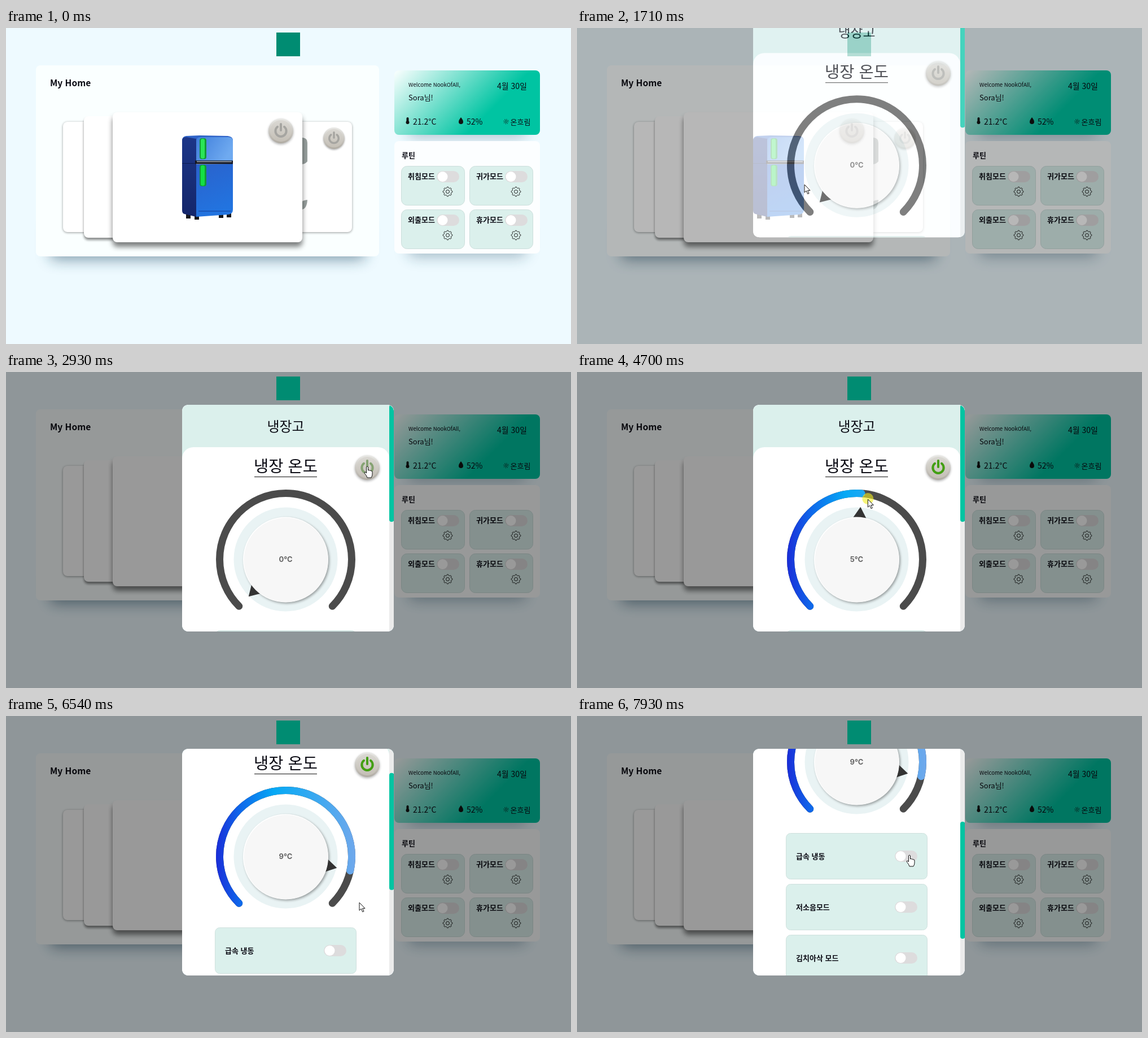
Animation, 1001 px wide and 559 px high, one loop 8 s. Source, as an HTML page:

```html
<!DOCTYPE html>
<html lang="ko">
<head>
<meta charset="utf-8">
<title>My Home</title>
<style>
  html, body { margin: 0; width: 100%; height: 100%; overflow: hidden; background: #eefaff; }
  svg { display: block; width: 1001px; height: 559px; }
  text { font-family: 'Noto Sans CJK KR', 'Noto Sans', sans-serif; fill: #0b0b14; white-space: pre; }
</style>
</head>
<body>
<svg id="stage" viewBox="0 0 1001 559"></svg>
<script>
const CX = 495.5, CY = 331.5;
const MINT = '#dbf0ec', TEAL = '#00c4a2';

// ---------- drawing helpers ----------
const rect = (x, y, w, h, r, fill, extra = '') =>
  `<rect x="${x}" y="${y}" width="${w}" height="${h}" rx="${r}" fill="${fill}" ${extra}/>`;
const circle = (x, y, r, fill, extra = '') =>
  `<circle cx="${x}" cy="${y}" r="${r}" fill="${fill}" ${extra}/>`;
const path = (d, fill, extra = '') => `<path d="${d}" fill="${fill}" ${extra}/>`;
const text = (x, y, size, str, extra = '') =>
  `<text x="${x}" y="${y}" font-size="${size}" ${extra}>${str}</text>`;
const group = (attrs, ...parts) => `<g ${attrs}>${parts.join('')}</g>`;
const gradient = (id, coords, ...stops) =>
  `<linearGradient id="${id}" ${coords}>${stops.map(([o, c]) =>
    `<stop offset="${o}" stop-color="${c}"/>`).join('')}</linearGradient>`;
const blur = (id, size) =>
  `<filter id="${id}" x="-20%" y="-60%" width="140%" height="220%"><feGaussianBlur stdDeviation="${size}"/></filter>`;

const polar = (r, deg) => {
  const a = deg * Math.PI / 180;
  return [CX + r * Math.sin(a), CY - r * Math.cos(a)].map(v => v.toFixed(2)).join(' ');
};

const panel = (x, y, w, h, fill, depth) =>
  rect(x + 25, y + h - 60, w - 50, 65, 8, '#1d4a63', `opacity="${depth}" filter="url(#blur13)"`) +
  rect(x, y, w, h, 8, fill);

const card = (x, y, w, h, drop, depth) =>
  rect(x, y + drop, w, h, 8, '#000', `opacity="${depth}" filter="url(#blur${drop > 4 ? 5 : 2})"`) +
  rect(x, y, w, h, 8, '#fff');

const powerGlyph = (color, extra = '') => group(
  `fill="none" stroke="${color}" stroke-width="4" stroke-linecap="round" ${extra}`,
  '<path d="M-6-7.2A9.6 9.6 0 1 0 6-7.2"/><path d="M0-12V-1"/>');

const powerButton = (x, y, scale = 1, extra = '') => group(
  `transform="translate(${x} ${y}) scale(${scale})"`,
  circle(0, 2, 22, '#000', 'opacity=".3" filter="url(#blur2)"'),
  circle(0, 0, 22, 'url(#metal)'),
  circle(0, 0, 19, 'url(#metalInner)'),
  powerGlyph('#a6a5a1'), extra);

const toggle = (x, y) =>
  rect(x, y - 10, 40, 20, 10, '#dddcdd') + circle(x + 10.5, y, 9, '#fff');

const gear = (x, y) => {
  const points = Array.from({ length: 80 }, (_, i) => {
    const a = i / 80 * 2 * Math.PI, r = 7.5 + 0.9 * Math.tanh(2 * Math.cos(8 * a));
    return `${(x + r * Math.cos(a)).toFixed(1)},${(y + r * Math.sin(a)).toFixed(1)}`;
  });
  return group('fill="none" stroke="#111"',
    `<polygon points="${points.join(' ')}"/>`, circle(x, y, 3, 'none'));
};

const routine = (x, y, label) =>
  rect(x + .5, y + .5, 112, 69, 10, MINT, 'stroke="#cbdedb"') +
  text(x + 12, y + 23, 13, label, 'font-weight="600"') +
  toggle(x + 63, y + 19) + gear(x + 82.5, y + 45.5);

const option = (y, label) =>
  rect(370.5, y + .5, 250, 81, 8, MINT, 'stroke="#cfe0dd"') +
  text(388, y + 46, 13, label, 'font-weight="600"') + toggle(563, y + 41);

// ---------- scene ----------
const defs = `<defs>
  ${blur('blur13', 13)}${blur('blur5', 5)}${blur('blur2', 2)}
  ${gradient('metal', 'x2="0" y2="1"', [0, '#e9e9e6'], [1, '#b0aba2'])}
  ${gradient('metalInner', 'x2="0" y2="1"', [0, '#dad8d3'], [1, '#c4bfb6'])}
  ${gradient('welcome', 'gradientUnits="userSpaceOnUse" x1="724" y1="39" x2="910" y2="225"',
    [0, '#fcffff'], [.65, TEAL])}
  ${gradient('dialFill', 'gradientUnits="userSpaceOnUse" x1="372" y1="0" x2="618" y2="0"',
    [0, '#1a2dd8'], [.17, '#0f67ea'], [.42, '#05a9f5'], [1, '#6ea8ec'])}
  ${gradient('fridgeFront', 'x2=".3" y2="1"', [0, '#2a62cc'], [1, '#2274e0'])}
  ${gradient('fridgeTop', 'x2="1" y2=".4"', [0, '#3f7edb'], [1, '#6faaf0'])}
  ${gradient('fridgeSide', 'x2="0" y2="1"', [0, '#1c3688'], [1, '#14266a'])}
  <clipPath id="modalClip">${rect(312, 58, 375, 401, 12, '#fff')}</clipPath>
</defs>`;

const fridge = group('',
  path('M319 328h8v9h-8zM334 331h8v8h-8zM377 329h8v7h-8zM391 326h8v9h-8z', '#17171c'),
  path('M312 199Q312 192 319 191L343 190 393 191Q402 192 402 199L337 204z', '#2f63c8'),
  path('M312 198Q313 193 320 193L337 196V334L316 329Q312 328 312 322z', 'url(#fridgeSide)'),
  path('M337 236V200Q337 193 345 193H394Q402 193 402 200V235z', 'url(#fridgeTop)'),
  path('M337 241L402 240V321Q402 329 394 330L337 334z', 'url(#fridgeFront)'),
  path('M341 324H398', 'none', 'stroke="#123d94"'),
  path('M312 239.500H337', 'none', 'stroke="#0d1c50"'),
  path('M335 237.500H402', 'none', 'stroke="#15151d" stroke-width="6"'),
  path('M338 236.500H400', 'none', 'stroke="#a8b4c4" stroke-width="1.500"'),
  rect(343, 195, 12, 37, 4, '#129b35'), rect(345, 196, 7, 35, 3, '#2ae656'),
  rect(343, 242, 12, 38, 4, '#129b35'), rect(345, 243, 7, 36, 3, '#14e044'));

const washer = path('M520 194H526Q534 195 534 203V236Q528 243 520 240z', '#98a09e') +
  path('M520 321H525Q533 319 534 304 527 304 520 310z', '#98a09e');

const home = group('',
  panel(53, 66, 608, 338, '#faffff', .55),
  text(78, 102.5, 15.6, 'My Home', 'font-weight="600"'),
  card(101, 166, 285, 195, 1, .4),
  card(328, 166, 285, 195, 1, .4),
  washer,
  powerButton(581, 195, .86),
  card(138, 156, 314, 215, 4, .45),
  card(189, 149, 336, 230, 8, .5),
  fridge,
  powerButton(487, 182));

const weather = group('',
  panel(688, 75, 258, 114, 'url(#welcome)', .3),
  text(713, 103.5, 9.6, 'Welcome NookOfAll,'),
  text(713, 128, 13, 'Sora님!'),
  text(870, 108, 14, '4월 30일'),
  text(721, 170.5, 14, '21.2°C'),
  text(816, 170.5, 14, '52%'),
  text(893.5, 170.5, 13, '온흐림'),
  rect(709.5, 158, 4, 9, 2, '#111'), circle(711.5, 167, 3, '#111'),
  path('M806 158Q810 163 810 166A4 4 0 0 1 802 166Q802 163 806 158', '#111'),
  circle(886, 165.5, 1.8, 'none', 'stroke="#111" stroke-width=".8"'),
  circle(886, 165.5, 3.9, 'none', 'stroke="#111" stroke-width="1.200" stroke-dasharray="1 2.060"'));

const routines = group('',
  panel(688, 200, 258, 199, '#fcfeff', .38),
  text(701, 230, 13, '루틴', 'font-weight="600"'),
  routine(700, 244, '취침모드'), routine(821, 244, '귀가모드'),
  routine(700, 321, '외출모드'), routine(821, 321, '휴가모드'));

const track = `M${polar(117, -135)}A117 117 0 1 1 ${polar(117, 135)}`;
const stroke = color => `stroke="${color}" stroke-width="13" stroke-linecap="round"`;
const dial = group('',
  path(track, 'none', stroke('#4b4b4b')),
  path(track, 'none', `id="fill" pathLength="270" ${stroke('url(#dialFill)')}`),
  circle(CX, CY, 92, '#e9f3f4'),
  circle(CX + 2, CY + 2.5, 75.5, '#000', 'opacity=".35" filter="url(#blur2)"'),
  `<polygon id="pointer" points="${CX},${CY - 93} ${CX - 12},${CY - 73} ${CX + 12},${CY - 73}" fill="#333"/>`,
  circle(CX, CY + .5, 75.5, '#fff'), circle(CX + .5, CY + 1, 74.5, '#f7f7f7'),
  text(CX, 336, 13, '', `id="value" text-anchor="middle" style="font:700 13px Inter,sans-serif;fill:#666"`));

const centered = 'text-anchor="middle" font-weight="300"';
const modal = group('id="modal"', group('clip-path="url(#modalClip)"',
  rect(312, 58, 375, 401, 0, '#fff'),
  group('id="content"',
    rect(312, 58, 375, 110, 0, MINT),
    rect(312, 133, 367, 800, 20, '#fff'),
    text(CX, 104.5, 24, '냉장고', centered),
    text(CX, 177, 28.5, '냉장 온도', centered),
    rect(440, 185, 111, 1, 0, '#111'),
    powerButton(640, 169, 1, powerGlyph('#43a012', 'id="lit"')),
    dial,
    option(457, '급속 냉동'), option(547, '저소음모드'), option(637, '김치아삭 모드')),
  rect(679, 58, 8, 401, 0, '#ebebeb'),
  rect(679, 58, 8.5, 207, 4, TEAL, 'id="thumb"')));

const cursor = group('id="cursor"',
  circle(0, -1, 10, '#f4ee20', 'id="press" opacity=".6"'),
  path('M0 0V14L3.300 11 5.700 16.500 8 15.500 5.600 10.300H10z', '#fff', 'id="arrow" stroke="#111"'),
  path('M-1.500 1Q0-1 1.500 1V7Q3 5.500 4.500 7.500 6 6.500 7 8 9 7.500 9 10V14Q9 17 7 20H0Q-1 16-4.500 12.500-5.500 10-3.500 10L-1.500 12z',
    '#fff', 'id="hand" stroke="#111" stroke-linejoin="round"'));

document.getElementById('stage').innerHTML = defs + home + weather + routines +
  path('', '#000', 'id="shade" fill-rule="evenodd"') +
  rect(479, 8, 42, 42, 0, '#008c72') + modal + cursor;

// ---------- motion ----------
const clamp = x => Math.min(1, Math.max(0, x));
const smooth = x => x * x * (3 - 2 * x);
const linear = x => x;
const easeOut = x => 1 - (1 - x) ** 2.2;
const progress = (t, from, to, ease = linear) => ease(clamp((t - from) / (to - from)));

// keys: [time, ...values]
function sample(keys, t, ease) {
  const i = keys.findIndex(k => k[0] > t);
  if (i === 0) return keys[0].slice(1);
  if (i < 0) return keys[keys.length - 1].slice(1);
  const [a, b] = [keys[i - 1], keys[i]], p = progress(t, a[0], b[0], ease);
  return a.slice(1).map((v, j) => v + (b[j + 1] - v) * p);
}

const cursorKeys = [
  [290, 920, 575], [1100, 363, 214], [1450, 403, 277], [1940, 403, 277],
  [2730, 640, 167], [3370, 640, 167], [4170, 433, 388], [4210, 433, 388],
  [4420, 394, 304], [4560, 433, 241], [4700, 515, 225], [4970, 602, 257],
  [5470, 618, 360], [5660, 618, 360], [5920, 626, 330], [7540, 626, 330], [7930, 589, 246]];
const dialKeys = [[4210, -135], [4420, -85], [4560, -42], [4700, 4], [4970, 52], [5470, 102.5]];
const scrollKeys = [[6250, 0], [6540, 83], [6660, 83], [6940, 167], [7130, 167], [7340, 250]];

const el = Object.fromEntries([...document.querySelectorAll('[id]')].map(e => [e.id, e]));
const set = (id, name, value) => el[id].setAttribute(name, value);
const show = (id, on) => set(id, 'visibility', on ? 'visible' : 'hidden');

function draw(t) {
  const open = progress(t, 1541, 1941, easeOut), lift = 300 * (1 - open);
  set('modal', 'opacity', open);
  set('modal', 'transform', `translate(0 ${-lift})`);
  // the shade leaves the area behind the modal undimmed
  set('shade', 'd', `M0-400H1001V559H0zM324 ${58 - lift}h351q12 0 12 12v377q0 12-12 12h-351q-12 0-12-12v-377q0-12 12-12z`);
  set('shade', 'opacity', 0.4 * open);
  set('lit', 'opacity', progress(t, 2800, 3220));

  const [angle] = sample(dialKeys, t, linear), turned = angle + 135;
  show('fill', turned > 0);
  set('fill', 'stroke-dasharray', `${turned} 600`);
  set('pointer', 'transform', `rotate(${angle} ${CX} ${CY})`);
  el.value.textContent = Math.round(turned / 27) + '°C';

  const [scroll] = sample(scrollKeys, t, smooth);
  set('content', 'transform', `translate(0 ${-scroll})`);
  set('thumb', 'y', 58 + scroll * 0.516);

  const dragging = t >= 4210 && t < 5600;
  const hand = (t > 2640 && t < 3480) || t > 7840;
  const [x, y] = sample(cursorKeys, t, dragging ? linear : smooth);
  set('cursor', 'transform', `translate(${x} ${y})`);
  show('press', dragging);
  show('hand', hand);
  show('arrow', !hand);
}

function frame() {
  draw(performance.now() % 8000);
  requestAnimationFrame(frame);
}
frame();
</script>
</body>
</html>
```
